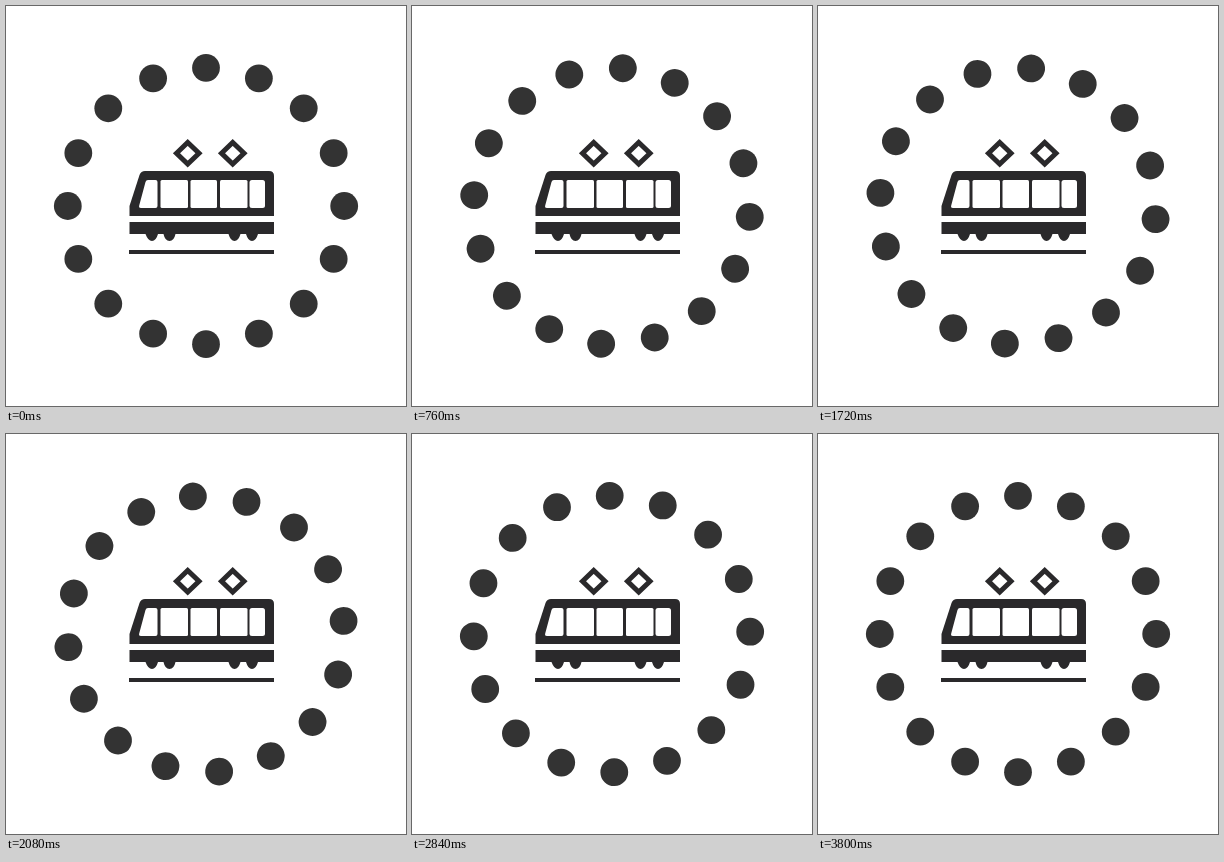
An HTML page for the animation above (3.84 s loop, 400 px wide and 400 px high).

```html
<!DOCTYPE html>
<html lang="en">
<head>
<meta charset="utf-8">
<title>Tram loader</title>
<style>
  html, body { margin: 0; width: 100%; height: 100%; overflow: hidden; background: #fff; }
  svg { display: block; width: 100vw; height: 100vh; }
</style>
</head>
<body>
<svg viewBox="0 0 400 400">
  <g id="ring" fill="#333"></g>
  <g fill="#2a292b">
    <path d="M123.500 210V200L133.500 169Q135 165 139 165H263Q268 165 268 170V210Z"/>
    <path d="M123.500 216H268V228H252Q250 235 246 235T240 228H234.500Q232.500 235 228.500 235T222.500 228H169.500Q168 235 163.500 235T157.500 228H152Q150 235 146 235T139.500 228H123.500Z"/>
    <path d="M123 244H268V248H123Z"/>
  </g>
  <g fill="#fff">
    <path d="M142 174H149.500Q151.500 174 151.500 176V200Q151.500 202 149.500 202H135Q132.500 202 133.200 199.500L139.500 176Q140 174 142 174Z"/>
    <rect x="154.500" y="174" width="27.500" height="28" rx="1.500"/>
    <rect x="184.500" y="174" width="26.500" height="28" rx="1.500"/>
    <rect x="214" y="174" width="27.500" height="28" rx="1.500"/>
    <rect x="243.500" y="174" width="15.500" height="28" rx="2.500"/>
  </g>
  <path d="M170.500 147.200L181.700 136.500L193 147.200L181.700 158Z
           M215.500 147.200L226.700 136.500L238 147.200L226.700 158Z"
        fill="none" stroke="#2a292b" stroke-width="5"/>
</svg>
<script>
  const DOTS = 16, STEP = 40, FRAMES = 96;
  const ring = document.getElementById('ring');

  for (let i = 0; i < DOTS; i++) {
    const dot = document.createElementNS(ring.namespaceURI, 'circle');
    const angle = i / DOTS * 2 * Math.PI;
    dot.setAttribute('cx', 200 + 138.2 * Math.cos(angle));
    dot.setAttribute('cy', 200 + 138.2 * Math.sin(angle));
    dot.setAttribute('r', 13.9);
    ring.append(dot);
  }

  // One full turn per loop; the last step repeats the first pose.
  function draw() {
    const step = Math.floor(performance.now() / STEP) % FRAMES;
    ring.setAttribute('transform', `rotate(${360 * step / (FRAMES - 1)} 200 200)`);
    requestAnimationFrame(draw);
  }
  draw();
</script>
</body>
</html>
```
